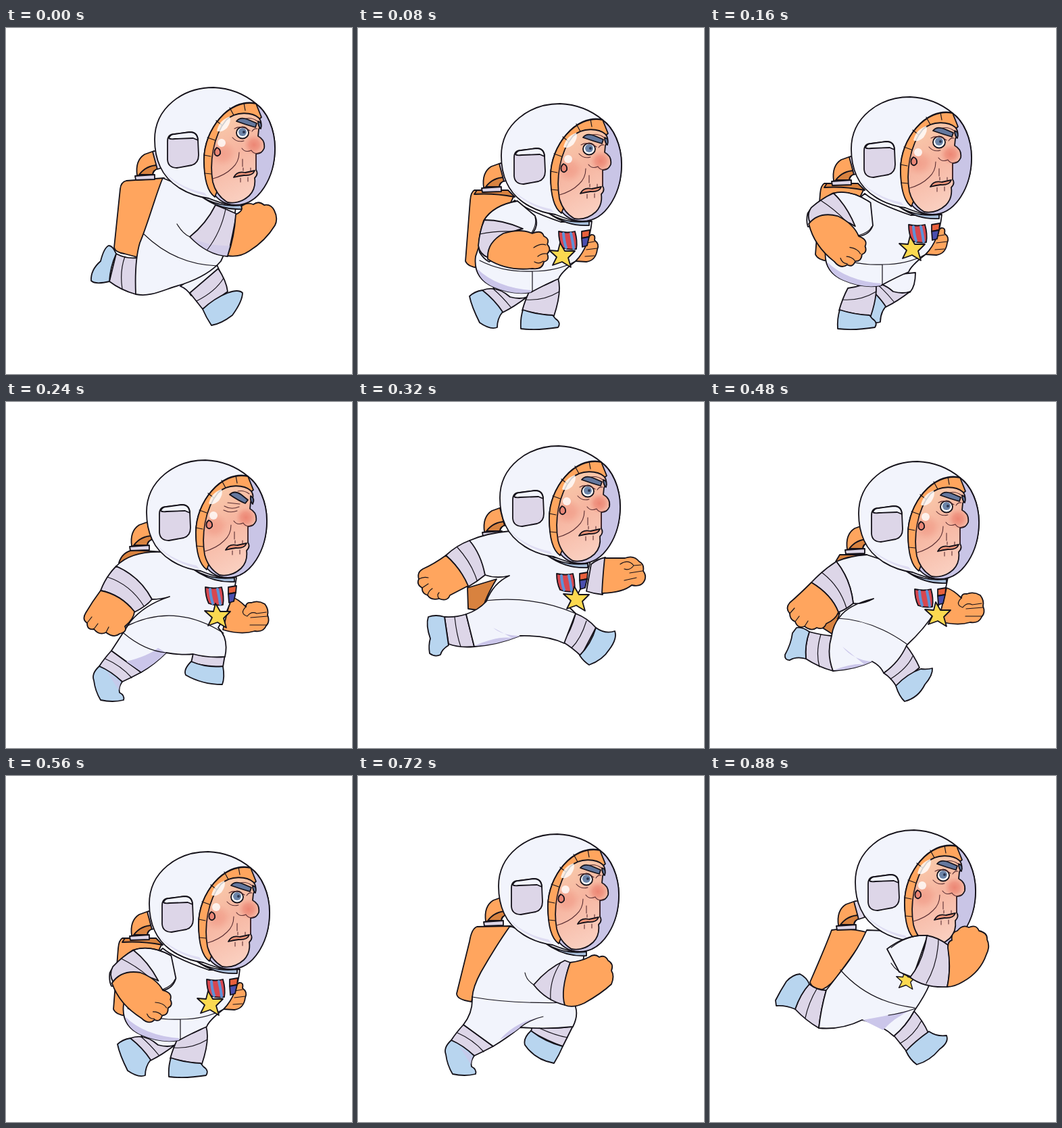
These frames come from a looping animation (512 px wide and 512 px high, 0.96 s). An HTML page without scripts:

```html
<!DOCTYPE html>
<html lang="en">
<head>
<meta charset="utf-8">
<title>Running astronaut</title>
<style>
html, body { margin: 0; width: 100%; height: 100%; overflow: hidden; background: #fff; }
svg { display: block; width: 100vw; height: 100vh; }
path, ellipse { stroke: #15121a; stroke-width: 1.8; stroke-linejoin: round; stroke-linecap: round; }
.w { fill: #f2f4fc; }
.l { fill: #ddd6e8; }
.o { fill: #ffa55e; }
.d { fill: #d8823f; }
.b { fill: #b8d5ef; }
.n { fill: none; stroke-width: 1.2; }
.f { fill: none; stroke: #5b2f33; stroke-width: 1.1; }
.s { fill: #cbc6ea; stroke: none; }
.h { fill: #fff; stroke: none; opacity: .8; }
.pose { visibility: hidden; animation: show .96s step-end infinite; animation-delay: calc((var(--i) - 12) * 80ms); }
@keyframes show { 0% { visibility: visible } 8.334%, 100% { visibility: hidden } }
</style>
</head>
<body>
<svg viewBox="0 0 512 512">
<defs>
  <linearGradient id="skin" x1=".2" y1="0" x2=".5" y2="1">
    <stop offset="0" stop-color="#f9cdac"/><stop offset=".45" stop-color="#f6b5a0"/><stop offset="1" stop-color="#fad0c1"/>
  </linearGradient>
  <radialGradient id="blush">
    <stop offset="0" stop-color="#ec8674"/><stop offset=".5" stop-color="#ee8f7c" stop-opacity=".8"/><stop offset="1" stop-color="#f09a86" stop-opacity="0"/>
  </radialGradient>

  <g id="helmet">
    <path fill="#a9c0dc" d="M290,250Q315,266 350,262L350,268Q318,270 290,250Z"/>
    <path class="w" d="M220,165C220,118 262,88 307,88C330,89 352,97 370,112C388,125 398,152 398,178C398,212 384,242 356,258C340,266 325,262 300,252C270,248 240,232 228,205C222,192 220,180 220,165Z"/>
    <path class="s" d="M231,209Q252,238 298,249L294,244Q254,236 231,209Z" opacity=".5"/>
    <path fill="#c9c5e6" d="M368,111C330,104 293,150 293,195C293,235 312,262 340,262C375,262 398,220 398,178C398,150 386,122 368,111Z"/>
    <path class="o" d="M370,112C330,104 293,150 293,195C293,225 299,243 309,250L345,160L378,132Z"/>
    <path class="n" d="M293,188L303,190M298,162L309,166M311,137L321,145M331,118L337,129M352,111L354,122M294,215L304,216"/>
    <path fill="url(#skin)" d="M306,228C301,200 306,160 326,136C340,123 364,124 374,133Q381,141 374,150L373,160Q384,166 382,178Q378,187 370,186L370,210Q374,216 368,222Q370,238 360,248Q346,261 328,258Q311,248 306,228Z" stroke-width="1.3"/>
    <g fill="url(#blush)">
      <circle cx="321" cy="185" r="20" opacity=".45"/>
      <circle cx="367" cy="173" r="15"/>
    </g>
    <path class="f" d="M349,178Q354,185 363,181Q367,188 376,184M345,184Q345,198 335,207Q324,218 306,223M370,188V208M350,194V205M351,207V211M362,207V211M347,222V228M358,221V227M355,134Q364,132 372,138"/>
    <path fill="#ee9478" stroke-width="1.1" d="M337,221Q342,211 354,214L368,211Q365,219 352,218Q344,219 337,221Z"/>
    <path fill="#e98676" stroke="#b9665a" stroke-width="1" d="M312,177Q318,179 317,186Q313,192 309,187Q307,181 312,177Z"/>
    <circle class="h" cx="319" cy="170" r="6"/>
    <path class="h" d="M312,152Q316,136 331,131Q334,138 327,148Q318,156 312,152Z"/>
    <path class="l" d="M239,168Q239,157 249,157L272,154Q283,154 284,165L285,188Q285,200 275,203L253,207Q240,207 239,195Z"/>
    <path class="w" d="M241,163Q243,157 250,157L272,154Q283,154 284,166L277,163L250,164Q243,165 241,163Z" stroke-width="1.2"/>
  </g>
  <g id="head">
    <use href="#helmet"/>
    <ellipse cx="350" cy="155" rx="9" ry="8.5" fill="#fff" stroke-width="1.1"/>
    <circle cx="350" cy="154" r="6" fill="#6b84a8"/>
    <circle cx="352" cy="154" r="2" fill="#2b3550"/>
    <path class="f" d="M335,162Q342,170 352,167M338,149Q348,143 361,152M372,149Q367,148 364,153"/>
    <path fill="#64789e" stroke-width="1" d="M341,138Q346,131 357,135L371,141L369,147Q355,143 341,138ZM373,138Q380,140 377,149Q373,146 373,138Z"/>
  </g>
  <g id="headShut">
    <use href="#helmet"/>
    <path class="f" d="M335,156Q345,162 357,157M334,162Q344,167 354,163M340,151L358,153"/>
    <path fill="#64789e" stroke-width="1" d="M343,139Q350,132 360,139L370,147L366,152Q356,148 343,139ZM374,141Q381,145 377,153Q373,149 374,141Z"/>
  </g>

  <g id="tube">
    <path class="o" d="M194,218Q191,196 205,187L219,182L227,207Q217,210 217,219Z"/>
    <path class="d" d="M197,217Q208,203 225,203L227,207Q217,210 217,217Z" stroke="none"/>
    <path class="l" d="M217,183L225,181L233,206L224,209Z"/>
    <path class="l" d="M191,219L220,217V224L192,225Z"/>
  </g>
  <g id="ribbons">
    <path fill="#d8474f" d="M-13,-14Q0,-11 11,-14Q15,0 13,12Q2,14-8,10Q-13,0-13,-14Z" stroke-width="1.2"/>
    <path d="M-6,-11Q-5,2-2,10M5,-11Q8,2 9,11" fill="none" style="stroke:#5d92d8;stroke-width:4"/>
    <path fill="#e8603c" stroke-width="1" d="M21,-14L33,-16L32,-6L21,-4Z"/>
    <path fill="#4a4fae" stroke-width="1" d="M21,-4L32,-6L29,7L22,9Z"/>
  </g>
  <path id="star" fill="#fbd950" stroke-width="1.3" d="M-3,-18L4,-6L19,-6L9,4L13,18L0,10L-14,15L-8,3L-19,-7L-6,-6Z"/>

  <!-- arms -->
  <g id="armHigh">
    <path class="w" d="M262,256Q290,234 322,236L300,298L280,290Z" stroke="none"/>
    <path class="l" d="M296,298Q315,275 321,236Q338,239 352,250Q357,285 351,312Q318,314 296,298Z"/>
    <path class="n" d="M268,254Q292,235 321,236M268,277Q276,290 296,298M320,307Q337,278 338,242"/>
    <path class="o" d="M352,254Q352,244 358,243Q356,232 366,229Q374,219 383,224Q394,219 398,229Q411,232 410,242Q415,252 409,264Q400,290 375,304Q362,312 351,312Q357,285 352,254Z"/>
  </g>
  <g id="armMid">
    <path class="w" d="M236,256Q200,262 186,285Q176,315 180,332Q186,342 194,346L258,304Q268,292 262,278Z" stroke="none"/>
    <path class="n" d="M236,256Q200,262 186,285M262,280Q265,290 257,303"/>
    <path class="l" d="M187,284Q215,284 244,297Q208,304 193,340Q180,335 178,322Q180,300 187,284Z"/>
    <path class="n" d="M180,305Q205,300 226,301"/>
    <path class="o" d="M192,342Q190,318 215,304Q240,296 258,304Q272,298 275,308Q284,312 280,320Q287,328 280,334Q284,344 275,346Q273,358 258,356Q220,360 192,342Z"/>
    <path class="n" d="M260,325Q270,318 278,321M266,338Q272,333 279,334M261,346Q268,350 274,345"/>
  </g>
  <g id="armBack">
    <path class="l" d="M130,227Q146,212 165,205Q182,225 188,256Q176,266 162,274Q152,246 130,227Z"/>
    <path class="n" d="M147,215Q168,238 176,264"/>
    <path class="o" d="M130,227Q112,240 96,247Q87,252 90,262Q86,270 95,275Q94,283 103,286Q108,294 120,291Q132,296 136,286L163,272Q152,246 130,227Z"/>
    <path class="n" d="M90,262Q97,258 104,260M95,275L104,269M103,286Q104,280 110,276M120,291Q116,286 120,282"/>
  </g>
  <g id="farReach">
    <path class="l" d="M345,240Q355,232 366,230L362,285Q350,284 338,280Z"/>
    <path class="o" d="M365,231L395,231Q408,226 416,236Q424,240 422,250Q428,258 423,266Q418,274 405,271Q392,282 361,283Q362,260 365,231Z"/>
    <path class="n" d="M388,240Q400,232 408,242Q402,250 394,247M408,242L419,241M402,253L421,250M394,264L412,260"/>
  </g>
  <g id="farFist">
    <path class="o" d="M350,275Q360,278 372,290Q372,283 380,284Q390,280 400,286Q406,294 404,302Q408,312 402,318Q398,328 385,326Q365,332 338,324Z"/>
    <path class="n" d="M372,290Q362,300 374,304Q380,296 388,300L402,298M379,306L404,304M378,317H402"/>
  </g>

  <!-- legs -->
  <g id="legsReach">
    <path class="l" d="M128,318Q145,319 160,314L172,362Q150,364 134,358Z"/>
    <path class="b" d="M104,318Q115,314 128,318L134,360Q124,366 122,374Q114,378 106,372Q104,360 107,350Q100,330 104,318Z"/>
    <path class="l" d="M322,313Q340,320 352,334L330,376Q318,364 303,355Q315,340 322,313Z"/>
    <path class="b" d="M352,334Q366,344 380,339Q384,350 372,366Q362,382 342,389Q334,384 328,375Q345,358 352,334Z"/>
    <path class="n" d="M143,318Q146,345 152,362M338,324Q330,350 316,364"/>
  </g>
  <g id="legsPush">
    <path class="l" d="M272,384Q290,370 302,348Q315,362 323,380L292,409Q282,396 272,384Z"/>
    <path class="b" d="M290,407Q304,392 324,378Q336,386 350,384Q354,394 340,404Q325,422 306,427Q296,420 290,407Z"/>
    <path class="l" d="M147,308Q158,317 172,317Q164,345 161,373Q142,362 126,345Q134,322 147,308Z"/>
    <path class="b" d="M97,332Q104,318 113,304Q122,294 133,293Q143,298 147,308Q134,322 126,345Q112,339 98,340Z"/>
    <path class="n" d="M158,315Q146,335 141,358M281,396Q302,384 313,362"/>
  </g>
  <g id="hip">
    <path class="s" d="M226,361Q262,355 298,346Q272,358 256,376Z"/>
    <path class="n" d="M264,354Q285,351 304,344"/>
  </g>
  <g id="shinBack">
    <path class="l" d="M156,368Q145,380 138,391Q155,400 172,414Q185,408 200,400Q178,384 156,368Z"/>
    <path class="b" d="M138,391Q126,402 130,412Q132,428 140,441Q158,445 174,441Q176,434 168,430Q166,422 172,414Q155,398 138,391Z"/>
    <path class="s" d="M150,400L170,414L167,427Z" opacity=".7"/>
    <path class="n" d="M147,380Q170,390 186,408"/>
  </g>
  <g id="swing">
    <path class="w" d="M196,376L258,370Q258,390 250,399L214,408Z"/>
    <path class="l" d="M184,388Q205,380 225,398Q240,402 250,398Q232,412 214,421Q200,405 184,388Z"/>
    <path class="b" d="M184,388Q172,390 165,397Q168,412 180,436Q196,447 206,443Q206,430 214,420Q202,402 184,388Z"/>
    <path class="n" d="M200,386Q214,398 226,413"/>
  </g>
  <g id="plant">
    <path class="l" d="M256,385Q280,382 296,370Q302,390 290,426Q268,424 243,418Q248,400 256,385Z"/>
    <path class="b" d="M244,417Q240,430 241,445Q265,448 296,443Q301,436 292,430L288,425Q265,424 244,417Z"/>
    <path class="n" d="M248,402Q275,404 298,390"/>
  </g>

  <g id="crouch">
    <path class="o" d="M172,240Q167,243 166,255L159,345Q162,353 178,355L230,250L215,240Z"/>
    <path class="d" d="M176,240L222,240L232,250Q200,244 172,246Z" stroke="none"/>
    <use href="#tube" x="-8" y="18"/>
    <path class="o" d="M328,338Q336,312 345,306Q352,305 350,314Q358,320 354,328Q352,344 338,346L322,345Z"/>
    <path class="n" d="M338,318L350,316M338,328L354,326M336,338L350,337"/>
    <path class="w" d="M232,255Q250,270 300,287L346,286Q342,325 322,345Q300,362 297,371Q280,378 256,391Q230,396 200,383Q170,370 174,338L190,290Z"/>
    <path class="s" d="M176,356Q205,384 256,388V391Q230,396 200,383Q180,374 176,356Z"/>
    <path class="n" d="M180,344Q215,362 258,360Q295,360 322,345M258,360V390"/>
    <use href="#ribbons" x="310" y="315"/>
    <use href="#star" x="302" y="336"/>
    <use href="#head" x="-8" y="24"/>
  </g>
  <path id="pack" class="o" d="M180,228Q172,250 148,305Q150,314 166,316Q180,310 193,290L235,232Q205,224 180,228Z"/>
</defs>

<g class="pose" style="--i:0">
  <path class="o" d="M178,226Q170,228 169,238L160,325Q162,332 175,334L198,340L220,300L234,222Z"/>
  <use href="#tube"/>
  <path class="s" d="M250,380Q266,386 274,396L322,372L310,346Z"/>
  <path class="w" d="M258,382Q268,386 274,396L320,368L310,346Z"/>
  <path class="l" d="M272,392L314,356Q326,374 328,390L291,416Z"/>
  <path class="b" d="M291,416Q308,400 328,392Q344,386 350,392Q350,404 335,425Q318,438 304,440Q296,428 291,416Z"/>
  <path class="l" d="M163,334Q178,342 195,340L192,394Q170,388 153,375Z"/>
  <path class="b" d="M152,322Q145,325 140,345Q125,358 126,374Q132,380 153,375Q154,354 163,334Q158,322 152,322Z"/>
  <path class="w" d="M232,222C222,245 210,290 198,318Q190,345 192,394C215,399 235,386 262,379Q300,366 318,345Q335,310 340,265L300,250Z"/>
  <path class="n" d="M204,305Q250,350 313,352M176,338Q168,360 172,386M282,404Q310,390 322,370"/>
  <use href="#head"/>
  <path class="l" d="M272,309Q296,290 310,262Q326,268 341,275Q336,305 328,338Q298,336 272,309Z"/>
  <path class="s" d="M274,310Q302,324 332,322L328,337Q298,335 274,310Z" opacity=".6"/>
  <path class="n" d="M253,290Q262,305 272,309M298,328Q318,302 325,268"/>
  <path class="o" d="M340,276Q352,270 348,264Q357,257 366,261Q374,255 382,262Q392,260 397,270Q403,282 398,292Q384,315 360,330Q345,340 328,337Q338,310 340,276Z"/>
</g>

<g class="pose" style="--i:1">
  <use href="#swing"/><use href="#plant"/><use href="#crouch"/><use href="#armMid"/>
</g>

<g class="pose" style="--i:2">
  <use href="#swing" x="46" y="-8"/><use href="#plant" x="-52"/>
  <use href="#crouch" x="-3" y="-10"/>
  <use href="#armMid" transform="translate(-12 -12) rotate(44 225 280)"/>
</g>

<g class="pose" style="--i:3">
  <path class="d" d="M167,238Q172,222 188,219L232,222L225,245Z"/>
  <use href="#tube" x="-8" y="-5"/>
  <use href="#farFist" x="-17" y="13"/>
  <use href="#shinBack"/>
  <path class="l" d="M277,372Q300,380 324,374L321,392Q300,392 274,386Z"/>
  <path class="b" d="M274,384Q262,396 266,404Q290,418 320,418Q324,408 321,391Q298,394 274,384Z"/>
  <path class="w" d="M232,222Q185,220 163,243Q195,258 216,292Q230,292 242,288Q205,300 184,325L156,368L200,400Q220,388 237,371Q262,375 277,373Q300,379 324,377Q330,350 314,334Q335,300 341,260L290,245Z"/>
  <path class="s" d="M178,384Q210,376 225,364L237,371Q220,388 200,399Z"/>
  <path class="n" d="M178,332Q250,296 322,342M174,342Q205,368 237,371"/>
  <path class="l" d="M163,243Q148,258 140,279Q170,285 190,311Q208,302 216,292Q198,258 163,243Z"/>
  <path class="n" d="M150,259Q184,270 204,302"/>
  <path class="o" d="M140,279Q128,295 118,312Q112,322 120,327Q120,338 130,336Q138,346 148,341Q160,350 168,343Q180,340 176,332Q190,320 190,310Q170,285 140,279Z"/>
  <path class="n" d="M120,327L127,318M130,336L136,328M148,341L152,333"/>
  <use href="#ribbons" x="308" y="288"/><use href="#star" x="313" y="316"/>
  <use href="#headShut" x="-12" y="-2"/>
</g>

<g class="pose" style="--i:4">
  <path class="d" d="M162,275L163,306L184,309Q188,290 205,262Z"/>
  <use href="#tube" x="-7" y="-26"/>
  <use href="#farReach"/><use href="#legsReach"/>
  <path class="w" d="M225,191Q190,194 165,205L188,256Q205,262 224,257Q200,268 190,295Q178,308 160,314L172,362Q205,360 240,346Q280,345 305,357L322,313L312,303Q335,275 344,235L290,230Z"/>
  <path class="s" d="M172,361Q205,346 228,349L200,334Q214,346 240,346Q205,360 172,361Z"/>
  <path class="n" d="M188,294Q260,286 322,313"/>
  <use href="#armBack"/>
  <use href="#ribbons" x="307" y="268"/><use href="#star" x="323" y="291"/>
  <use href="#head" x="-10" y="-23"/>
</g>

<g class="pose" style="--i:5">
  <path class="d" d="M164,288L164,316L186,310L205,276Z"/>
  <use href="#tube" x="-2" y="-9"/>
  <use href="#farReach" x="-6" y="22"/><use href="#legsPush"/>
  <path class="w" d="M232,212Q195,212 171,223L194,274Q212,276 226,272Q200,290 186,305L172,317Q164,345 161,373Q195,376 225,361Q254,368 272,385Q290,370 302,348Q334,310 348,252L290,240Z"/>
  <use href="#hip"/>
  <path class="n" d="M188,303Q250,305 305,345"/>
  <use href="#armBack" x="6" y="18"/>
  <use href="#ribbons" x="311" y="282"/><use href="#star" x="328" y="306"/>
  <use href="#head" x="-5" y="-8"/>
</g>

<g class="pose" style="--i:6">
  <path class="d" d="M186,236L192,226L232,226V240ZM160,330L192,312L182,344Z"/>
  <use href="#tube" x="9"/>
  <use href="#farFist"/>
  <path class="l" d="M147,340Q165,345 180,346Q174,372 182,398Q160,392 142,380Q140,360 147,340Z"/>
  <path class="b" d="M128,334Q136,332 147,340Q140,360 142,380Q128,376 118,382Q110,382 111,374Q120,358 122,342Z"/>
  <path class="l" d="M257,401Q280,385 290,360Q302,375 310,393L276,421Q268,408 257,401Z"/>
  <path class="b" d="M275,420Q292,402 312,395Q322,396 329,394Q330,404 318,418Q308,438 288,443Q280,436 275,420Z"/>
  <path class="w" d="M232,226Q205,228 187,236Q208,262 212,298Q225,300 242,291Q205,300 192,318Q182,330 180,346Q172,372 182,398Q215,396 240,384Q252,390 257,401Q280,385 291,360Q345,310 352,260L290,245Z"/>
  <path class="s" d="M182,397Q212,386 228,388L196,362Q212,382 240,384Q215,396 182,397Z"/>
  <path class="n" d="M188,320Q240,322 291,358M164,344Q156,370 162,392M267,410Q292,394 300,376"/>
  <path class="l" d="M150,267Q168,248 187,236Q208,262 212,298Q200,308 190,311Q180,285 150,267Z"/>
  <path class="o" d="M150,267Q132,285 118,297Q111,305 118,313Q118,322 126,325Q130,336 140,332Q150,340 158,334Q168,338 172,328Q186,322 190,311Q180,285 150,267Z"/>
  <path class="n" d="M165,252Q192,272 202,305M118,313L125,305M126,325L132,317M140,332L145,324"/>
  <use href="#ribbons" x="316" y="291"/><use href="#star" x="337" y="314"/>
  <use href="#head"/>
</g>

<g class="pose" style="--i:7">
  <use href="#swing"/><use href="#plant"/><use href="#crouch"/>
  <use href="#armMid" transform="translate(-4 -2) rotate(38 225 280)"/>
</g>

<g class="pose" style="--i:8">
  <use href="#swing" x="46" y="-8"/><use href="#plant" x="-52"/>
  <use href="#crouch" x="-3" y="-10"/>
  <use href="#armMid" transform="translate(4 -8) rotate(-16 225 280)"/>
</g>

<g class="pose" style="--i:9">
  <path class="o" d="M176,223Q168,226 165,245L146,322Q146,331 168,334Q172,300 226,222Z"/>
  <use href="#tube" x="-5" y="-3"/>
  <use href="#shinBack"/>
  <path class="l" d="M258,370Q285,376 318,370L303,400Q280,392 256,378Z"/>
  <path class="b" d="M256,377Q244,388 247,398Q262,420 290,425Q298,412 303,400Q278,394 256,377Z"/>
  <path class="w" d="M225,222Q205,250 182,290Q170,312 169,328Q170,350 156,368L200,400Q220,388 240,372Q280,375 318,371Q326,355 322,342L335,262L280,245Z"/>
  <path class="s" d="M210,390Q235,362 275,356Q250,362 240,372Q225,384 210,390Z"/>
  <path class="n" d="M169,327Q230,338 320,335M240,372Q255,360 274,356M268,373Q292,384 310,387"/>
  <use href="#head" x="-12" y="-2"/>
  <path class="l" d="M260,309Q280,285 306,273L314,276Q303,305 306,339Q278,332 260,309Z"/>
  <path class="n" d="M247,291Q249,302 260,309M285,331Q283,302 300,276"/>
  <path class="o" d="M314,276Q330,274 342,268Q350,262 357,268Q366,264 370,273Q379,278 375,288Q380,296 375,308Q360,322 335,336Q318,344 306,339Q299,318 314,276Z"/>
</g>

<g class="pose" style="--i:10">
  <use href="#pack" x="-4" y="-22"/><use href="#tube" x="-7" y="-24"/>
  <use href="#legsReach"/>
  <path class="w" d="M225,195Q205,235 190,262Q184,300 160,314L172,362Q205,360 240,346Q280,345 305,357L322,313L318,300L345,235L290,230Z"/>
  <path class="n" d="M186,282Q240,308 320,312"/>
  <use href="#ribbons" x="302" y="266"/><use href="#star" x="312" y="290"/>
  <use href="#head" x="-10" y="-23"/>
  <use href="#armHigh" x="17" y="-14"/>
</g>

<g class="pose" style="--i:11">
  <use href="#pack"/><use href="#tube" x="-4" y="3"/>
  <use href="#legsPush"/>
  <path class="w" d="M232,228C220,255 205,275 193,290L172,317Q164,345 161,373Q195,376 225,361Q254,368 272,385Q290,370 302,348Q318,325 325,308L345,250L290,230Z"/>
  <use href="#hip"/>
  <path class="n" d="M193,287Q235,335 303,343"/>
  <use href="#star" transform="translate(290 302) scale(.75)"/>
  <use href="#head" x="-5" y="-8"/>
  <use href="#armHigh"/>
</g>
</svg>
</body>
</html>
```
